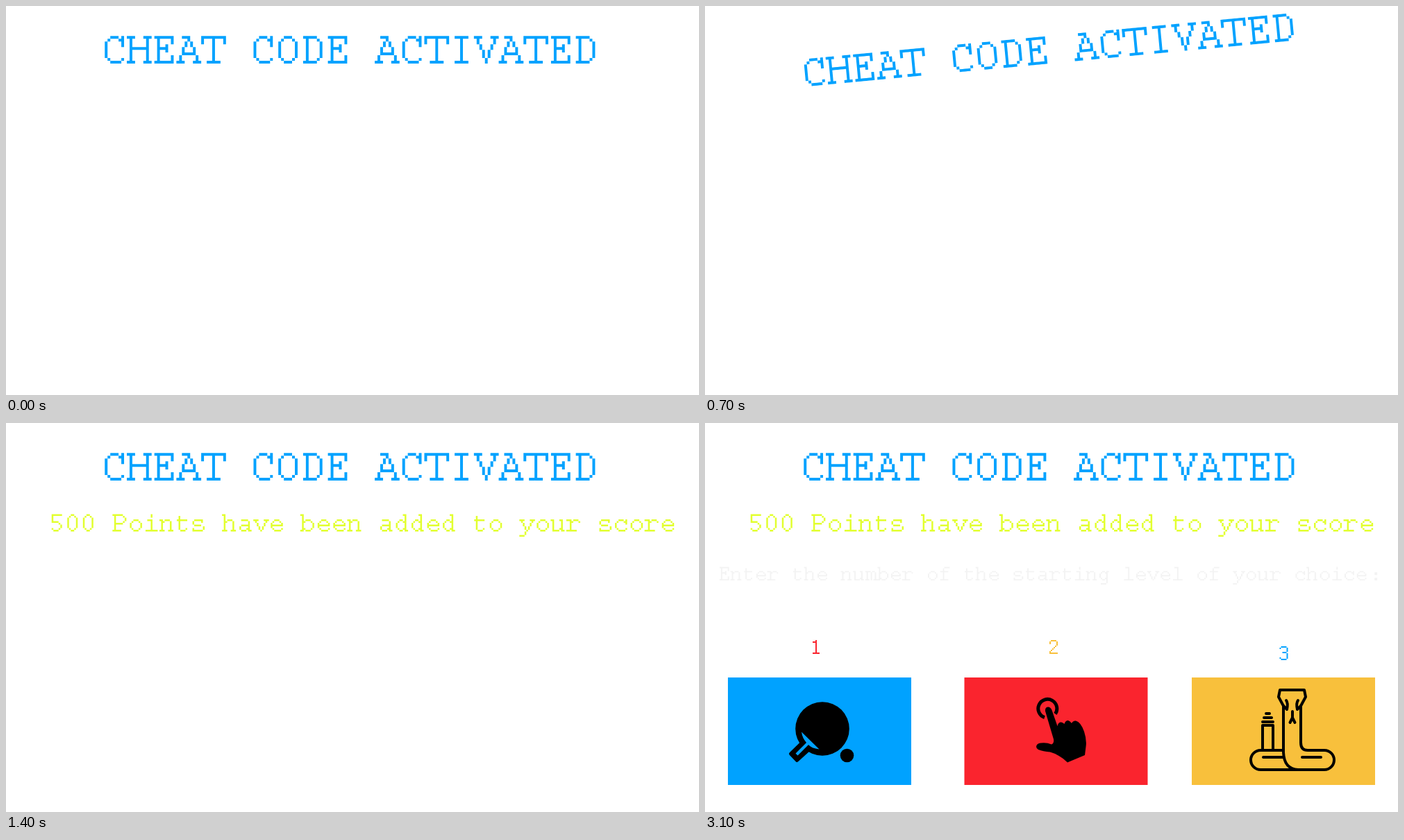
Animation of 998 by 561 pixels, one loop 3.6 s. Source, as an HTML page:

```html
<!DOCTYPE html>
<html lang="en">
<head>
<meta charset="utf-8">
<title>Cheat code</title>
<style>
  html, body { margin: 0; width: 100%; height: 100%; overflow: hidden; background: #fff; }
  svg { display: block; width: 100%; height: 100%; }
  .line { fill: none; stroke: #000; stroke-width: 4; stroke-linecap: round; stroke-linejoin: round; }
</style>
</head>
<body>
<svg id="stage" viewBox="0 0 998 561">
  <g data-from="0" id="title"></g>
  <g data-from="1400" id="points"></g>
  <g data-from="2100" id="prompt"></g>

  <g data-from="2100" id="level1">
    <rect x="33" y="367" width="264" height="155" fill="#00a2ff"/>
    <circle cx="169" cy="441" r="38.8"/>
    <circle cx="204.5" cy="479.5" r="9.8"/>
    <path d="M123.5 477L144 457L154 467L132.5 486.5Z" stroke="#000" stroke-width="5" stroke-linejoin="round"/>
    <path d="M139 445.5L164.5 470.5Q153 469 149 464L133.5 479.5L130.5 476.5L146 461Q140 454 139 445.5Z" fill="#00a2ff"/>
  </g>

  <g data-from="2600" id="level2">
    <rect x="373.5" y="367" width="264" height="155" fill="#fa242e"/>
    <path class="line" style="stroke-width:5;stroke-linecap:butt" d="M489 424.7A13.5 13.5 0 1 1 504.5 419.5"/>
    <path d="M490 415.5Q489.5 409.5 494.5 409.5Q498 410 499.5 414L507.500 437Q509 431 513 431.5Q516 432 517.5 434Q519 429 523 429Q526 430 528 433Q530 429 534 429.5Q541 431 546 445Q550 457 548.5 467L547 479L522 489.5Q510 478 497 474.5Q487 473.5 480 471Q476 469 477.5 465Q479 461.5 484 461.5Q492 460.5 499 463.5Q503 462 502 456Z"/>
  </g>

  <g data-from="3100" id="level3">
    <rect x="701" y="367" width="264" height="155" fill="#f8c03c"/>
    <g class="line">
      <path d="M828 385H863L865 395L858 408L853 413Q851 404 854 400M828 385L826 395L833 408L838 413Q840 404 837 400"/>
      <path d="M846 416V425L842.5 432M846 425L849.5 432"/>
      <path d="M833 408V475Q834 499 854 500H892A14 14 0 0 0 892 472H868Q858 472 858 461V408"/>
      <path d="M833 472H800A14 14 0 0 0 800 500H854M804 482H833M860 482H887"/>
      <path d="M803 471V436H818V471M803 431H818M805 425H816M808 419H813"/>
    </g>
  </g>
</svg>
<script>
// Letters are assembled from shared parts on a grid nine squares wide.
const CAP = 0, LOW = 3, BASE = 9, DROP = 12;
const LEFT = 1, MID = 4, RIGHT = 7, WIDTH = 9;

function line(x1, y1, x2, y2) {
  const steps = Math.max(Math.abs(x2 - x1), Math.abs(y2 - y1)) || 1;
  return Array.from({ length: Math.floor(steps) + 1 }, (_, i) => ({
    x: Math.round(x1 + (x2 - x1) * i / steps),
    y: Math.round(y1 + (y2 - y1) * i / steps)
  }));
}
const dot = (x, y) => line(x, y, x, y);
const bar = (y, from = LEFT, to = RIGHT) => line(from, y, to, y);
const stem = (x, top = CAP, bottom = BASE) => line(x, top, x, bottom);
const serif = (x, y = BASE) => bar(y, x - 1, x + 1);
const foot = bar(BASE, 2, 6);
const mirror = parts => [parts, parts.flat(Infinity).map(({ x, y }) => ({ x: WIDTH - 1 - x, y }))];
const side = (x, inward, top, bottom = BASE) =>
  [stem(x, top + 2, bottom - 2), dot(x + inward, top + 1), dot(x + inward, bottom - 1)];
const ring = (top, right = RIGHT) => [
  side(LEFT, 1, top), side(right, -1, top),
  bar(top, LEFT + 2, right - 2), bar(BASE, LEFT + 2, right - 2)
];
const openRing = top => [
  side(LEFT, 1, top), bar(top, 3, 5), dot(6, top + 1), bar(BASE, 3, 6), dot(RIGHT, BASE - 1)
];
const wedge = top => mirror([serif(LEFT, top), line(LEFT, top + 1, MID, BASE)]);
const leftStem = top => [dot(0, top), stem(LEFT, top)];
const arch = [dot(2, 4), bar(LOW, 3, 5), stem(6, 4), serif(LEFT), serif(6)];

const LETTERS = {
  A: [bar(CAP, 2, 4), mirror([line(3.5, 1, 0.7, BASE), serif(LEFT)]), bar(6, 2, 6)],
  C: [openRing(CAP), stem(RIGHT, CAP, 3)],
  D: [stem(2), side(RIGHT, -1, CAP), bar(CAP, 1, 5), bar(BASE, 1, 5)],
  E: [stem(2), bar(CAP), bar(BASE), bar(4, 2, 5), stem(5, 3, 5), stem(RIGHT, CAP, 2), stem(RIGHT, 7)],
  H: [mirror([stem(LEFT), serif(LEFT, CAP), serif(LEFT)]), bar(4)],
  I: [stem(MID), bar(CAP, 2, 6), foot],
  O: ring(CAP),
  P: [stem(LEFT), side(RIGHT, -1, CAP, 5), bar(CAP, 0, 5), bar(5, 1, 5), bar(BASE, 0, 4)],
  T: [stem(MID), bar(CAP, 0, 8), mirror(stem(0, CAP, 2)), foot],
  V: wedge(CAP),
  a: [bar(LOW, 2, 5), stem(6, 4), bar(6, 2, 5), stem(LEFT, 7, 8), bar(BASE, 2, 4), dot(5, 8), dot(RIGHT, BASE)],
  b: [leftStem(CAP), dot(0, BASE), ring(LOW)],
  c: [openRing(LOW), stem(RIGHT, LOW, 5)],
  d: [ring(LOW, 6), dot(5, CAP), stem(6), dot(RIGHT, BASE)],
  e: [openRing(LOW), bar(6), dot(RIGHT, 5)],
  f: [bar(CAP, 4, 7), stem(3, 1), bar(LOW, 1, 6), bar(BASE, 1, 6)],
  g: [ring(LOW, 6), bar(LOW, 6, 7), stem(6, LOW, DROP - 1), bar(DROP, 2, 5)],
  h: [leftStem(CAP), arch],
  i: [stem(MID, CAP, 1), bar(LOW, 2, 4), stem(MID, LOW), bar(BASE)],
  l: [bar(CAP, 2, 4), stem(MID), bar(BASE)],
  m: [leftStem(LOW), bar(LOW, 2, 3), bar(LOW, 5, 6), stem(MID, 4), stem(RIGHT, 4), mirror(serif(LEFT))],
  n: [leftStem(LOW), arch],
  o: ring(LOW),
  r: [bar(LOW, 0, 2), stem(2, LOW), dot(3, 4), bar(LOW, 4, 6), dot(RIGHT, 4), bar(BASE, 0, 5)],
  s: [bar(LOW, 2, 6), dot(6, 4), stem(LEFT, 4, 5), bar(6, 2, 5), stem(RIGHT, 7, 8), bar(BASE, 1, 6), dot(LEFT, 8)],
  t: [stem(2, 1, 8), bar(LOW, 1, 6), bar(BASE, 3, 5), dot(6, 8)],
  u: [leftStem(LOW), bar(LOW, 5, 6), stem(6, LOW), bar(BASE, 2, 4), dot(5, 8), dot(RIGHT, BASE)],
  v: wedge(LOW),
  y: [wedge(LOW), line(3, 10, 2, DROP), bar(DROP, 0, 2)],
  0: ring(CAP, 6),
  1: [bar(1, 2, 3), stem(MID), foot],
  2: [stem(LEFT, 1, 2), bar(CAP, 2, 5), stem(6, 1, 3), line(6, 3, LEFT, 8), bar(BASE, 1, 6)],
  3: [dot(LEFT, 1), bar(CAP, 2, 5), stem(6, 1, 3), bar(4, 3, 5), stem(6, 5, 8), bar(BASE, 2, 5), dot(LEFT, 8)],
  5: [bar(CAP, 1, 6), stem(LEFT, CAP, 4), bar(4, 1, 4), side(6, -1, 4), bar(BASE, 2, 4), dot(LEFT, 8)],
  ':': [bar(4, 5, 6), bar(5, 5, 6), bar(8, 5, 6), bar(BASE, 5, 6)],
  ' ': []
};

const $ = id => document.getElementById(id);

function write(id, text, x, y, size, color) {
  const squares = [...text].flatMap((char, i) =>
    LETTERS[char].flat(Infinity).map(cell => `M${i * WIDTH + cell.x} ${cell.y}h1v1h-1z`));
  const path = document.createElementNS('http://www.w3.org/2000/svg', 'path');
  path.setAttribute('d', [...new Set(squares)].join(''));
  path.setAttribute('fill', color);
  path.setAttribute('transform', `translate(${x} ${y}) scale(${size})`);
  path.setAttribute('role', 'img');
  path.setAttribute('aria-label', text);
  $(id).append(path);
}

const BLUE = '#00a2ff', RED = '#fa242e', AMBER = '#f8c03c';
write('title', 'CHEAT CODE ACTIVATED', 138.3, 43.3, 3.967, BLUE);
write('points', '500 Points have been added to your score', 63.2, 131.5, 2.504, '#e2ff2e');
write('prompt', 'Enter the number of the starting level of your choice:', 19, 207.5, 1.961, '#f3f3f3');
write('level1', '1', 151, 313, 2, RED);
write('level2', '2', 494, 313, 2, AMBER);
write('level3', '3', 825.5, 322, 2, BLUE);

const LOOP = 3600, STEP = 100, WOBBLE_END = 1200;
const TILTS = [0, -5.4, 6.9];
const parts = [...document.querySelectorAll('[data-from]')];

function draw(time) {
  const tilt = time < WOBBLE_END ? TILTS[Math.floor(time / STEP) % TILTS.length] : 0;
  $('title').setAttribute('transform', `rotate(${tilt} 495.6 63.2)`);
  for (const part of parts)
    part.setAttribute('visibility', time >= part.dataset.from ? 'visible' : 'hidden');
}

function tick() {
  draw(performance.now() % LOOP);
  requestAnimationFrame(tick);
}
tick();
</script>
</body>
</html>
```
